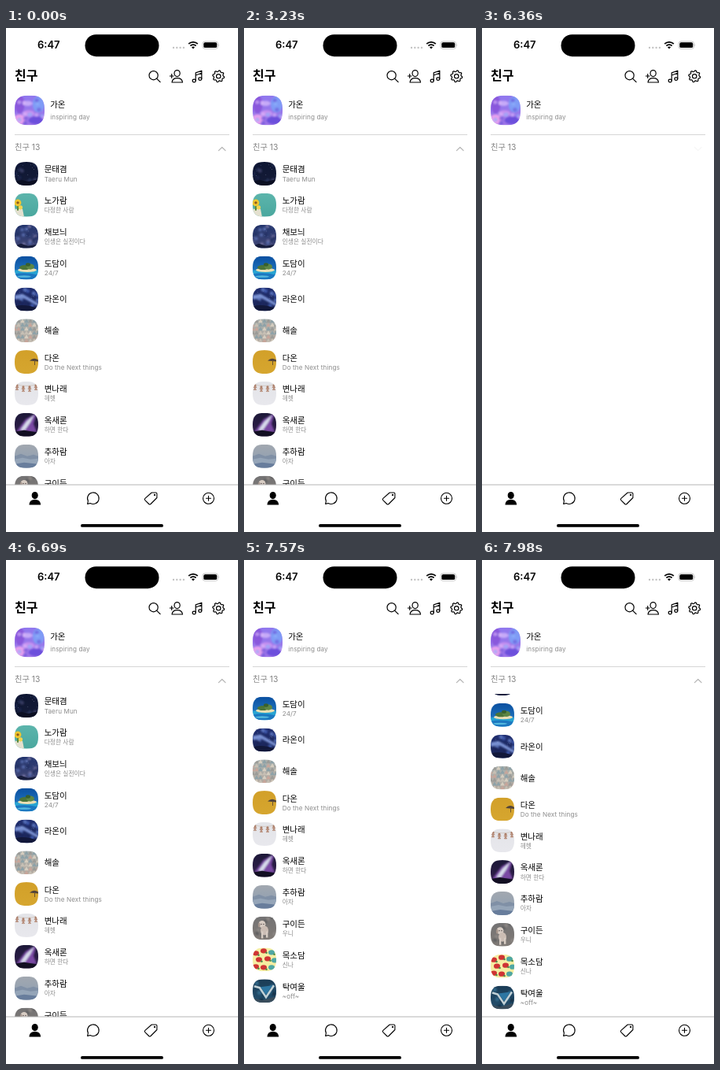
Animation, 295 px wide and 640 px high, one loop 8000 ms. Source, as an HTML page:

```html
<!DOCTYPE html>
<html lang="ko">
<head>
<meta charset="utf-8">
<style>
html, body { margin: 0; width: 100%; height: 100%; overflow: hidden; background: #fff; }
svg { display: block; width: 295px; height: 640px; }
text { font-family: Inter, "Noto Sans CJK KR", "Noto Sans CJK", sans-serif; fill: #000; }
.title { font-size: 16px; font-weight: 700; }
.clock { font-size: 13px; font-weight: 600; }
.name { font-size: 10.5px; }
.count { font-size: 10.3px; fill: #858585; }
.note { font-size: 8.15px; letter-spacing: .11px; fill: #8c8c8c; }
.note.ko { font-size: 7.75px; letter-spacing: 0; }
.line { fill: none; stroke: #000; stroke-width: 1.2; stroke-linecap: round; stroke-linejoin: round; }
.tab { fill: #fff; stroke: #000; stroke-width: 1.1; stroke-linecap: round; stroke-linejoin: round; }
.tab .mark { fill: #000; stroke: #000; }
.tab.on { fill: #000; }
.tab.on .mark { fill: #fff; stroke: #fff; }
</style>
</head>
<body>
<svg id="stage" viewBox="0 0 295 640" xmlns="http://www.w3.org/2000/svg"></svg>
<script>
const LOOP = 8000, ROW = 39.85;

const circle = (x, y, r, fill) => `<circle cx="${x}" cy="${y}" r="${r}" fill="${fill}"/>`;
const oval = (x, y, rx, ry, fill) => `<ellipse cx="${x}" cy="${y}" rx="${rx}" ry="${ry}" fill="${fill}"/>`;
const shape = (d, fill) => `<path d="${d}" fill="${fill}"/>`;
const soft = s => `<g filter="url(#soft)">${s}</g>`;
const text = (x, y, cls, s) => `<text x="${x}" y="${y}" class="${cls}">${s}</text>`;

function randomizer(seed) {
  return () => (seed = (seed * 16807) % 2147483647) / 2147483647;
}
function dots(n, seed, colors, size) {
  const rnd = randomizer(seed * 7919);
  let out = "";
  for (let i = 0; i < n; i++) {
    out += circle((rnd() * 30).toFixed(1), (rnd() * 30).toFixed(1), size, colors[i % colors.length]);
  }
  return out;
}
const clouds = (n, seed, colors, size) => soft(dots(n, seed, colors, size));
const stars = seed => `<g opacity=".6">${dots(18, seed, ["#dfe6ff", "#8fa2e0"], .4)}</g>`;

// Grid of small triangles in seeded colours
function triangles(seed, colors) {
  const rnd = randomizer(seed * 7919);
  let out = "";
  for (let y = 0; y < 30; y += 5) {
    for (let x = -3; x < 30; x += 5) {
      out += shape(`M${x} ${y + 5}l3-5 3 5z`, colors[Math.floor(rnd() * colors.length)]);
    }
  }
  return out;
}

const cookie = (x, y) => circle(x, y, 1.6, "#ad7f69") +
  `<path d="M${x - 2.2} ${y + 2.2}h4.4M${x} ${y + 1}v2.6l-1.4 2.4m1.4-2.4l1.4 2.4" stroke="#b58a76" stroke-width="1.5" fill="none"/>`;

// Pictures live in a 30 x 30 box: [top colour, bottom colour, shapes]
const pictures = {
  me: ["#9078ee", "#a077e8", soft(oval(5, 9, 5, 9, "#8a58dc") + oval(24, 9, 6, 8, "#7f9cf6") +
    oval(13, 8, 5, 2.5, "#c6aaf8") + oval(5, 24, 6, 5, "#e7a0ee") + oval(22, 25, 8, 4, "#6c50dc") +
    oval(14, 18, 6, 3, "#c791f0")) + `<g opacity=".6">${clouds(16, 5, ["#dcb8fa", "#6b52d8", "#8fb0fa"], 2)}</g>`],
  night: ["#0e1632", "#151c38", clouds(12, 3, ["#283258", "#1a2448", "#383c62"], 2.4) + stars(11) +
    shape("M0 25 9 23 18 25 30 22V30H0Z", "#0b0f22")],
  flower: ["#5cb5ac", "#4aa79e", shape("M0 20h10l2 10H0z", "#e4e0cf") + shape("M3 13h2v9H3z", "#5a8a3a") +
    circle(4, 12, 4.4, "#f0c52e") + circle(4, 12, 1.7, "#8a5a1c") + circle(7.5, 18, 2.6, "#f4d450")],
  galaxy: ["#22346c", "#424776", clouds(16, 8, ["#5468a8", "#243264", "#716f9e"], 2.2) + stars(29) +
    shape("M0 27 8 24 17 27 30 25V30H0Z", "#171d3c")],
  island: ["#0a4fa0", "#2b86cc", shape("M0 18H30V30H0Z", "#27a4d2") + oval(16, 17.8, 12, 2.6, "#eadfb4") +
    oval(13, 14.5, 7, 3, "#4b7438") + oval(20, 13.5, 5, 3.6, "#5d8644") + oval(17, 11, 3, 2.2, "#38602e") +
    shape("M0 23Q12 20 30 24V30H0Z", "#1c78c0") + oval(12, 26, 9, 1.2, "#54b9de")],
  comet: ["#202e70", "#1a2454", clouds(14, 12, ["#3e58ac", "#1a2456", "#5872bc"], 2.4) +
    soft(shape("M0 10 10 8 30 20V24L12 14 0 15Z", "#7890d2")) + stars(43) +
    shape("M0 24Q12 20 30 27V30H0Z", "#12183a")],
  mosaic: ["#a8b0ae", "#b3a9a0", triangles(9, ["#c6bfb4", "#c7a69b", "#8ea2a8", "#d5cdbf", "#9c9c98"])],
  mustard: ["#d2a029", "#d6a62f", shape("M19 13.5Q24 8.5 30 12.5V14.5Z", "#51433a") +
    shape("M25 13h1v6h-1z", "#6a5230")],
  garland: ["#e3e4e8", "#e8e8ed", `<path d="M0 3Q15 8 30 3" fill="none" stroke="#c4b6aa" stroke-width=".6"/>` +
    cookie(3, 5) + cookie(11, 7) + cookie(19, 7) + cookie(27, 5)],
  aurora: ["#1c1838", "#34204e", soft(shape("M2 24 14 8 28 0 24 14 28 24Z", "#7a4aa4") +
    shape("M7 22 15 11 25 2 20 12 13 22Z", "#d8dcec")) + shape("M0 24 12 22 30 25V30H0Z", "#120f22")],
  mist: ["#a2a8b0", "#8b9db2", shape("M0 15 8 12 16 15 24 13 30 15V30H0Z", "#8090a6") +
    shape("M0 19 10 17 20 19 30 18V30H0Z", "#95a5b8") + shape("M0 25 12 23 30 25V30H0Z", "#687d9c")],
  dog: ["#747374", "#807a76", clouds(8, 4, ["#8c8784", "#5e5e60"], 2.5) + oval(12, 10, 4.4, 4.6, "#d8cdc4") +
    oval(15, 18, 5, 6, "#cbbdb4") + shape("M11 19h2.4v9H11zM17 19h2.4v8H17z", "#d8cdc4") +
    oval(8.2, 11, 1.4, 3, "#a3938a") + circle(11, 10, .7, "#40383a") + circle(14, 10, .7, "#40383a")],
  fruit: ["#f6efa4", "#f4eca0", [[4, 7], [14, 4], [24, 6], [8, 15], [19, 14], [28, 16], [4, 24], [14, 25], [24, 25]]
    .map(([x, y], i) => oval(x, y, 4, 3.2, i % 3 == 2 ? "#4fa7a4" : "#cf3434") +
      circle(x + 3.5, y + 2.4, 1.3, "#4d8a4a")).join("")],
  wave: ["#1b3c56", "#24506e", clouds(8, 6, ["#123046", "#33698a"], 2.5) +
    `<path d="M2 9 9 11 17 23 27 8" fill="none" stroke="#c0d0d6" stroke-width="2.6"/>` +
    shape("M10 10 25 8 17 20Z", "#2d76a2") + shape("M0 24 12 27 30 22V30H0Z", "#3a4d5c")]
};

const friends = [
  ["문태겸", "Taeru Mun", "night"], ["노가람", "다정한 사람", "flower"],
  ["채보늬", "인생은 실전이다", "galaxy"], ["도담이", "24/7", "island"],
  ["라온이", "", "comet"], ["해솔", "", "mosaic"],
  ["다온", "Do the Next things", "mustard"], ["변나래", "헤헷", "garland"],
  ["옥새론", "하면 한다", "aurora"], ["추하람", "아자", "mist"],
  ["구이든", "우니", "dog"], ["목소담", "신나", "fruit"], ["탁여울", "~off~", "wave"]
];

const avatar = (key, x, y, size) =>
  `<g transform="translate(${x} ${y}) scale(${size / 30})"><g clip-path="url(#squircle)">` +
  `<rect width="30" height="30" fill="url(#sky-${key})"/>${pictures[key][2]}</g></g>`;

function friendRow([name, note, key], i) {
  const y = 185 + i * ROW;
  const cls = /[가-힣]/.test(note) ? "note ko" : "note";
  return avatar(key, 11, y - 15, 30) +
    text(48.7, y + (note ? -1.6 : 4), "name", name) +
    (note ? text(48.7, y + 9.5, cls, note) : "");
}

function gear(x, y) {
  const pts = [];
  for (let i = 0; i < 32; i++) {
    const a = (i + .5) * Math.PI / 16, r = i % 4 < 2 ? 7.4 : 5.9;
    pts.push((x + r * Math.cos(a)).toFixed(2) + "," + (y + r * Math.sin(a)).toFixed(2));
  }
  return `<polygon points="${pts.join(" ")}"/><circle cx="${x}" cy="${y}" r="2.7"/>`;
}

const gradients = Object.entries(pictures).map(([key, [top, bottom]]) =>
  `<linearGradient id="sky-${key}" x2="0" y2="1"><stop stop-color="${top}"/>` +
  `<stop offset="1" stop-color="${bottom}"/></linearGradient>`).join("");

const statusBar = text(40, 26.3, "clock", "6:47") +
  `<rect x="100.5" y="8.2" width="94" height="28" rx="14"/>` +
  [213, 217.3, 221.6, 225.9].map(x => circle(x, 25, 1.2, "#c4c4c4")).join("") +
  `<g fill="none" stroke="#000" stroke-width="1.8">
    <path d="M232.2 20.2a8.4 8.4 0 0 1 11.6 0M234.4 22.7a5.2 5.2 0 0 1 7.2 0"/></g>
  <path d="M236 24.4a3 3 0 0 1 4 0l-2 2.2z"/>
  <rect x="250" y="17" width="19.5" height="9.4" rx="3" fill="#fff" stroke="#b8b8b8" stroke-width=".8"/>
  <rect x="251.3" y="18.3" width="16.9" height="6.8" rx="1.9"/>
  <path d="M270.7 20.2q1.3 1.5 0 3z" fill="#aaa"/>`;

const header = text(11, 66, "title", "친구") +
  `<g class="line">
    <circle cx="187.6" cy="60.2" r="5.6"/><path d="M191.7 64.3l4.4 4.4"/>
    <ellipse cx="217.6" cy="57.6" rx="3.6" ry="4"/>
    <path d="M211 69c.5-4 3.6-5.4 6.7-5.4s6.3 1.4 6.8 5.4zM208.4 61h4.6M210.7 58.7v4.6"/>
    <path d="M241.2 66.5v-9.6l7.6-2.7v9.8M241.2 60l7.6-2.7"/>
    <ellipse cx="239.2" cy="67" rx="2" ry="1.8"/><ellipse cx="246.8" cy="64.6" rx="2" ry="1.8"/>
    ${gear(270.2, 61.3)}
  </g>` +
  avatar("me", 11, 85.6, 38) + text(56.2, 101.4, "name", "가온") + text(56.2, 116, "note", "inspiring day") +
  `<path d="M11 135.5H284" stroke="#d6d6d6"/>` + text(11, 154.6, "count", "친구 13");

const tabBar = `<rect y="580" width="295" height="60" fill="#fff"/>
  <path d="M0 580H295" stroke="#b4b4b4"/>
  <g class="tab"><ellipse cx="36.7" cy="593.5" rx="3.5" ry="3.9"/>
    <path d="M30 605c.5-4.2 3.7-5.6 6.8-5.6s6.3 1.4 6.8 5.6z"/></g>
  <g class="tab"><path d="M103.6 604.4l.8-3.8A7.3 7.3 0 1 1 107.2 603.5z"/></g>
  <g class="tab"><path d="M185.2 590h5.4q1.3 0 1.3 1.3v5.2l-8 8q-1.1 1-2.2 0l-4.9-4.9q-1-1.1 0-2.2z"/>
    <circle class="mark" cx="189" cy="592.9" r=".6"/></g>
  <g class="tab"><circle cx="257.5" cy="597.3" r="7"/>
    <path class="mark" d="M254.5 597.3h6M257.5 594.3v6"/></g>
  <rect x="95" y="630" width="105" height="3.8" rx="1.9"/>`;

document.getElementById("stage").innerHTML = `<defs>${gradients}
  <filter id="soft" x="-50%" y="-50%" width="200%" height="200%"><feGaussianBlur stdDeviation="1"/></filter>
  <clipPath id="squircle"><path d="M0 15C0 4 4 0 15 0S30 4 30 15 26 30 15 30 0 26 0 15Z"/></clipPath>
  <clipPath id="window"><rect y="170" width="295" height="410"/></clipPath></defs>
  <rect width="295" height="640" fill="#fff"/>
  ${statusBar}${header}
  <path id="chevron" fill="none" stroke="#b4b4b4" stroke-width="1.2" stroke-linecap="round" stroke-linejoin="round"/>
  <g clip-path="url(#window)"><g id="list">${friends.map(friendRow).join("")}</g></g>
  ${tabBar}`;

const list = document.getElementById("list");
const chevron = document.getElementById("chevron");
const tabs = document.querySelectorAll(".tab");

// Each step: start time and the values that change there
const steps = [
  [0, { tab: 0, open: true, fade: 1, scroll: 0 }],
  [500, { tab: 1 }], [1290, { tab: 2 }], [2150, { tab: 3 }], [3230, { tab: 0 }],
  [4730, { fade: .12 }], [4880, { open: false, fade: 1 }],
  [6360, { fade: .12 }], [6570, { open: true, fade: .3 }], [6690, { fade: 1 }],
  [7230, { scroll: 15 }], [7340, { scroll: 55 }], [7460, { scroll: 99 }], [7570, { scroll: 116 }],
  [7670, { scroll: 114.5 }], [7770, { scroll: 111 }], [7880, { scroll: 109 }], [7980, { scroll: 107.7 }]
];

function draw(t) {
  const s = Object.assign({}, ...steps.filter(([at]) => at <= t).map(([, change]) => change));
  tabs.forEach((tab, i) => tab.classList.toggle("on", i === s.tab));
  list.setAttribute("visibility", s.open ? "visible" : "hidden");
  list.setAttribute("transform", `translate(0 ${-s.scroll})`);
  chevron.setAttribute("d", s.open ? "M270.4 155.6l4.3-4.1 4.3 4.1" : "M270.4 151.5l4.3 4.1 4.3-4.1");
  chevron.setAttribute("opacity", s.fade);
}

const start = performance.now();
function tick() {
  draw((performance.now() - start) % LOOP);
  requestAnimationFrame(tick);
}
tick();
</script>
</body>
</html>
```
